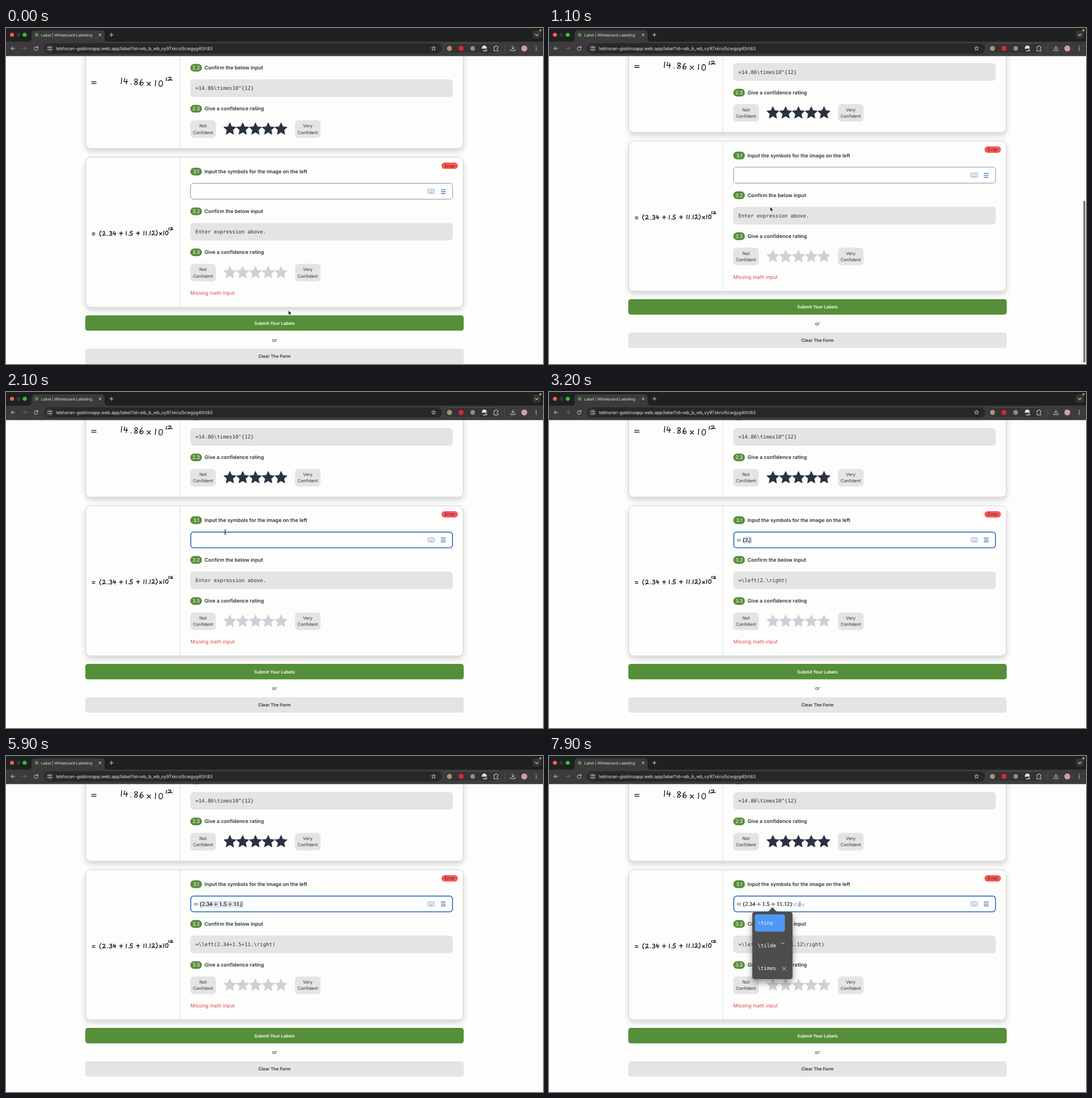
Recreate the animation shown at these times as an HTML page. Size 947x592 px, loop 8000 ms.

```html
<!DOCTYPE html>
<html lang="en">
<head>
<meta charset="utf-8">
<title>Label form</title>
<style>
html, body { margin: 0; width: 100%; height: 100%; overflow: hidden; background: #fdfdfb; }
svg { display: block; width: 947px; height: 592px; }
text { font: 8.78px Inter, sans-serif; fill: #293241; text-rendering: geometricPrecision; white-space: pre; }
.bold { font-weight: 600; font-size: 8.92px; }
.small { font-size: 7.7px; }
.mid { text-anchor: middle; }
.mono { font: 9px "DejaVu Sans Mono", monospace; }
.math { font: 10.15px "Liberation Serif", serif; text-anchor: middle; stroke-width: .2; }
.white { fill: #fff; }
.line { fill: none; stroke-linecap: round; stroke-linejoin: round; }
.ink { stroke: #111; stroke-width: 1.3; vector-effect: non-scaling-stroke; }
</style>
</head>
<body>
<svg viewBox="0 0 947 592">
  <defs>
    <filter id="soft" x="-10%" y="-10%" width="120%" height="130%">
      <feDropShadow dx="0" dy="5" stdDeviation="5" flood-opacity=".16"/>
    </filter>
    <filter id="deep" x="-50%" y="-30%" width="200%" height="170%">
      <feDropShadow dx="0" dy="6" stdDeviation="6" flood-opacity=".42"/>
    </filter>
  </defs>
  <g id="page"></g>
  <g id="overlay"></g>
  <g id="chrome"></g>
  <g id="pointer"></g>
</svg>
<script>
const $ = id => document.getElementById(id);
const GREEN = '#558f39', GREY = '#e4e5e3', SLATE = '#293241';

const rect = (x, y, w, h, r, fill, extra = '') =>
  `<rect x="${x}" y="${y}" width="${w}" height="${h}" rx="${r}" fill="${fill}" ${extra}/>`;
const text = (x, y, s, cls = '', extra = '') => `<text x="${x}" y="${y}" class="${cls}" ${extra}>${s}</text>`;
const line = (d, stroke, width = 1) => `<path class="line" d="${d}" stroke="${stroke}" stroke-width="${width}"/>`;
const dot = (x, y, r, fill) => `<circle cx="${x}" cy="${y}" r="${r}" fill="${fill}"/>`;

// Handwriting: each glyph is drawn in a 10 x 10 box.
const strokes = {
  0: 'M5 0C0 0-1 10 4 10S10 0 5 0', 1: 'M6 0 5 10', 2: 'M1 2C3-1 8-1 7 3S0 10 0 10Q5 8 10 9',
  3: 'M1 1C6-1 9 1 7 3S4 5 4 5C10 4 9 10 5 10S0 9 0 9', 4: 'M3 0 1 6H9M7 2 6 10',
  5: 'M9 0H3L2 5C10 3 10 9 5 10S0 9 0 9', 6: 'M6 0C1 3 0 9 3 10S9 8 8 6S3 5 2 8',
  8: 'M8 1C2-2 0 3 5 5S8 10 4 10S2 7 5 5S9 3 8 1', '.': 'M5 9.5 5.5 10', '=': 'M1 4H9M1 8H9',
  '+': 'M0 5H10M5 1V10', x: 'M1 4 8 10M8 4 1 10', '(': 'M8-2Q0 5 7 12', ')': 'M3-2Q11 5 2 12'
};
const hand = (chars, xs, y, w, h, slope = 0) => [...chars].map((c, i) =>
  `<path class="line ink" d="${strokes[c]}" transform="translate(${xs[i]} ${y + slope * (xs[i] - xs[0])}) scale(${w / 10} ${h / 10})"/>`).join('');

function star(cx, cy, R, fill) {
  const points = Array.from({ length: 10 }, (_, i) => {
    const r = i % 2 ? R * .47 : R, a = i * Math.PI / 5;
    return `${cx + r * Math.sin(a)},${cy - r * Math.cos(a)}`;
  });
  return `<polygon points="${points.join(' ')}" fill="${fill}" stroke="${fill}" stroke-linejoin="round"/>`;
}

const heading = (y, number, label) => rect(325, y - 6.8, 20.5, 13.6, 6.8, GREEN)
  + text(335.2, y + 3.1, number, 'white mid', 'font-weight="500"') + text(350, y + 3.1, label, 'bold');

const rateBox = (x, y, word) => rect(x, y, 45, 31, 6, GREY)
  + text(x + 22.5, y + 12.7, word, 'small mid') + text(x + 22.5, y + 24, 'Confident', 'small mid');

// Confirmation panel and star rating; y is the middle of the first heading.
const answer = (y, n, content, starFill) => heading(y, n + '.2', 'Confirm the below input')
  + rect(325, y + 20.5, 463, 31, 6, GREY) + text(334, y + 39, content, 'mono', `id="answer${n}"`)
  + heading(y + 72.3, n + '.3', 'Give a confidence rating')
  + rateBox(325, y + 92.5, 'Not') + rateBox(509.7, y + 92.5, 'Very')
  + [0, 1, 2, 3, 4].map(i => star(394.8 + 22.55 * i, y + 108.2, 11.3, starFill)).join('');

const card = (y, h) => rect(140.5, y, 666, h, 9, '#fdfdfb', 'stroke="#ced1dc" filter="url(#soft)"')
  + line(`M306.5 ${y}v${h}`, '#d9dbe2');

$('page').innerHTML = card(-40, 252.3) + answer(70, 2, '=14.86\\times10^{12}', SLATE)
  + hand('=', [150], 91.5, 10, 8)
  + hand('14.86x10', [199, 207, 216, 225, 235, 248, 259, 269], 88, 8.5, 10, .07) + hand('12', [278, 285], 87.5, 8.5, 5.5, -.1)
  + card(227.5, 264.5)
  + hand('=(2.34+1.5+11.12)x10',
      [151.5, 163, 170, 176, 182, 188.5, 200, 209, 213, 218, 230, 240, 244, 248, 251, 257, 263, 270, 275, 281], 358.7, 5.8, 7, -.009)
  + hand('12', [284.5, 289.5], 351.8, 5, 4)
  + heading(253, '3.1', 'Input the symbols for the image on the left')
  + rect(768, 237, 29, 11.3, 5.65, '#ff5652') + text(782.5, 245.5, 'Error', 'small mid')
  + '<rect id="field" fill="#fefefe" rx="5"/><g id="formula"></g>'
  + rect(744, 284, 11.3, 7.3, 1, 'none', 'stroke="#7897c6" stroke-width=".9"')
  + '<path d="M746 286.3h8M746 288h8" stroke="#7897c6" stroke-width=".8" stroke-dasharray="1 .7"/>'
  + line('M747.5 289.8h4.5', '#7897c6', .8)
  + line('M767.3 284.5h7.5m-7.5 3.4h7.5m-7.5 3.4h7.5', '#2863ba', 1.2)
  + answer(323, 3, '', '#ced0d7')
  + text(325, 470.1, 'Missing math input', '', 'style="fill:#da484d"')
  + rect(139.8, 506.2, 667.4, 27.1, 4.5, GREEN) + text(473.5, 522.7, 'Submit Your Labels', 'small bold mid white')
  + text(473.5, 552.5, 'or', 'mid')
  + rect(139.8, 565, 667.4, 27.1, 4.5, GREY) + text(473.5, 581.2, 'Clear The Form', 'small bold mid');

const PALE = '#d6d6d6';
$('chrome').innerHTML = rect(0, 0, 947, 25, 0, '#1f2020') + rect(0, 24, 947, 25.5, 0, '#3b3b3b')
  + '<path d="M40 24q5 0 5-5v-9q0-6 6-6h117q6 0 6 6v9q0 5 5 5z" fill="#3b3b3b"/>'
  + dot(10.5, 12, 3.6, '#fb5b55') + dot(22, 12, 3.6, '#353636') + dot(33, 12, 3.6, '#2fc244')
  + dot(54, 12, 3.3, '#4d8f45') + text(62, 14.5, 'Label | Whiteboard Labelling', '', 'style="font-size:6.7px;fill:#e4e4e4"')
  + line('M164 10l4 4m0-4l-4 4M183 12h6m-3-3v6', PALE)
  + rect(929, 4.5, 14, 14, 4, '#343535') + line('M933.5 11l2.5 2.3 2.5-2.3', PALE, 1.1) + dot(942.5, 4, 2, '#ef8b2c')
  + line('M15.5 36h-6.3m2.8-3l-3 3 3 3', PALE) + line('M30 36h6.3m-2.8-3l3 3-3 3', '#777')
  + line('M56 34.4a3.3 3.3 0 1 0 .4 2.6M56.3 32.5v2.2h-2.2', PALE)
  + rect(67, 27, 702, 18, 9, '#282828') + dot(77, 36, 7, '#3a3a3a')
  + line('M73.5 34h2m3 0h2.5m-7.5 4h2.5m3 0h2', PALE) + line('M77 33a1 1 0 1 0 .1 0M78 37a1 1 0 1 0 .1 0', PALE, .8)
  + text(88, 38.7, 'tebhoran-goblinsapp.web.app/label?id=wb_b_wb_vy97xkrui5cwgyg40rt83', '', 'style="font-size:7.85px;fill:#e6e6e6"')
  + `<g transform="translate(754 36) scale(.38)">${star(0, 0, 10, 'none').replace('stroke="none"', `stroke="${PALE}" stroke-width="2.4"`)}</g>`
  + rect(772.5, 27.5, 100.5, 17.5, 8.75, '#333', 'stroke="#575757" stroke-width=".8"')
  + dot(782, 36, 4.5, '#a59272') + dot(802.5, 36, 4.5, '#df2436') + dot(823, 36, 4.2, '#8b8b8b') + dot(843.5, 35, 4.3, '#dcdcdc')
  + rect(840, 36.5, 10, 7, 1.5, '#222') + text(845, 42, 'off', 'mid white bold', 'style="font-size:5.8px"')
  + line('M861 33h2q0-2 1.3-2t1.3 2h2.2v2.5q-2 0-2 1.3t2 1.3v2.4h-6.8z', PALE)
  + line('M879.5 30v12', '#555')
  + line('M894 31.8v5m-2.3-2.2l2.3 2.3 2.3-2.3m-6.2 3v2.2h7.8v-2.2', PALE)
  + dot(914, 36, 5.2, '#d3a09b') + [32.8, 36, 39.2].map(y => dot(935, y, .9, PALE)).join('');

// Piecewise linear value of a [time, value] track.
function track(keys, t) {
  const i = keys.findIndex(k => k[0] > t);
  if (i === 0) return keys[0][1];
  if (i < 0) return keys.at(-1)[1];
  const [[t0, a], [t1, b]] = [keys[i - 1], keys[i]];
  return a + (b - a) * (t - t0) / (t1 - t0);
}
const scrollTrack = [[400, 0], [500, -4], [600, -12], [700, -19], [800, -23.6], [900, -26.5], [1000, -28], [1100, -28.4], [1400, -27.1]];
const xTrack = [[800, 498], [900, 480], [1100, 390], [1300, 386.5]];
const yTrack = [[800, 497.5], [900, 470], [1100, 315], [1300, 272], [1700, 251], [1900, 247]];

const keystrokes = '=(2.34+1.5+11.12)\\ti';
const keyTimes = [2400, 2800, 3000, 3200, 3400, 3600, 3900, 4100, 4300, 4600, 4900, 5300, 5500, 5900, 6200, 6400, 6800, 7200, 7600, 7800];
const FOCUS_TIME = 1800, EM = 10.15, BASE = 291.2;

// Formula layout with TeX-like advances, in ems.
const advance = c => ({ '.': .278, '(': .389, ')': .389, '+': 1.222, '=': 1.056 })[c] ?? .5;

function formula(typed) {
  const [math, command] = typed.split('\\');
  let x = 331, glyphs = '';
  const put = (c, fill) => {
    const w = advance(c) * EM, mid = x + w / 2;
    if (c === '=') glyphs += line(`M${x + .6} 286.9h6.7m-6.7 2.5h6.7`, fill, .7);
    else if (c === '+') glyphs += line(`M${mid - 3.4} 288.2h6.8m-3.4-3.4v6.8`, fill, .7);
    else glyphs += text(mid, BASE, c, 'math', `style="fill:${fill};stroke:${fill}"`);
    x += w;
  };
  for (const c of math) put(c, '#111');
  let caret = x;
  if (math.includes('(') && !math.includes(')')) {
    put(')', '#999');
    glyphs = rect(341.5, 282, x - 341, 12.3, 2, '#dfe6ef') + glyphs;
  }
  if (command !== undefined) {
    const cell = 4.52, hint = 'tiny'.slice(command.length), style = 'font-size:7.5px;fill:';
    glyphs += text(x, BASE - .2, '\\' + command, 'mono', `style="${style}#3b70c4"`);
    caret = x + cell * (command.length + 1);
    if (command) glyphs += text(caret, BASE - .2, hint, 'mono', `style="${style}#a0a09c"`);
  }
  return glyphs + (typed ? line(`M${caret + .3} 283.7v9`, '#2a5297', 1) : '');
}

const popup = () => `<g filter="url(#deep)">${rect(358.5, 275, 71, 118, 4, '#4d4d4d')}<path d="M385.5 275.5l8.5-9 8.5 9z" fill="#4d4d4d"/></g>`
  + rect(363, 279, 53, 30.5, 4, '#4d98f6')
  + ['tiny', 'tilde', 'times'].map((s, i) => text(368, 297.3 + 39.7 * i, '\\' + s, 'mono white')).join('')
  + line('M410 330.5q1.2-1.4 2.5-.6t2.4-.6M411.7 371.6l6 6m0-6l-6 6', '#eee', .9);

function pointer(x, y, t) {
  if (t >= keyTimes[0]) return '';
  const overField = t >= 1700;
  return `<g transform="translate(${x} ${y})">` + (overField
    ? line('M-1.7-4Q0-4 0-2.8Q0-4 1.7-4M0-2.8V2.8M-1.7 4Q0 4 0 2.8Q0 4 1.7 4M-1 .8h2', '#222', .9)
    : '<path d="M0 0v8l1.9-1.7 1.4 3 1.4-.7-1.3-2.8h2.5z" fill="#111" stroke="#fff" stroke-width=".7"/>') + '</g>';
}

function draw(t) {
  const scroll = track(scrollTrack, t);
  $('page').setAttribute('transform', `translate(0 ${scroll})`);

  const focused = t >= FOCUS_TIME;
  const box = focused ? { x: 325.8, y: 273.8, width: 461.6, height: 27.7, stroke: '#1a63b8', 'stroke-width': 1.5 }
    : { x: 325.5, y: 273.5, width: 462.1, height: 28.2, stroke: '#8790ae', 'stroke-width': 1 };
  for (const name in box) $('field').setAttribute(name, box[name]);

  const typed = keystrokes.slice(0, keyTimes.filter(k => k <= t).length);
  $('formula').innerHTML = formula(typed);
  const [, inner] = typed.split('\\')[0].split('(');
  $('answer3').textContent = !typed ? 'Enter expression above.'
    : inner === undefined ? '=' : `=\\left(${inner.replace(')', '')}\\right)`;

  $('overlay').innerHTML = (t >= 500 && t < 1800 ? rect(942.3, 296 - scroll * .29, 3.6, 285.5, 1.8, '#72777b') : '')
    + (typed.includes('\\t') ? popup() : '');
  $('pointer').innerHTML = pointer(track(xTrack, t), track(yTrack, t), t);
}

let shown = -1;
const start = performance.now();
function tick() {
  const step = Math.floor((performance.now() - start) % 8000 / 100) * 100;
  if (step !== shown) draw(shown = step);
  requestAnimationFrame(tick);
}
tick();
</script>
</body>
</html>
```
